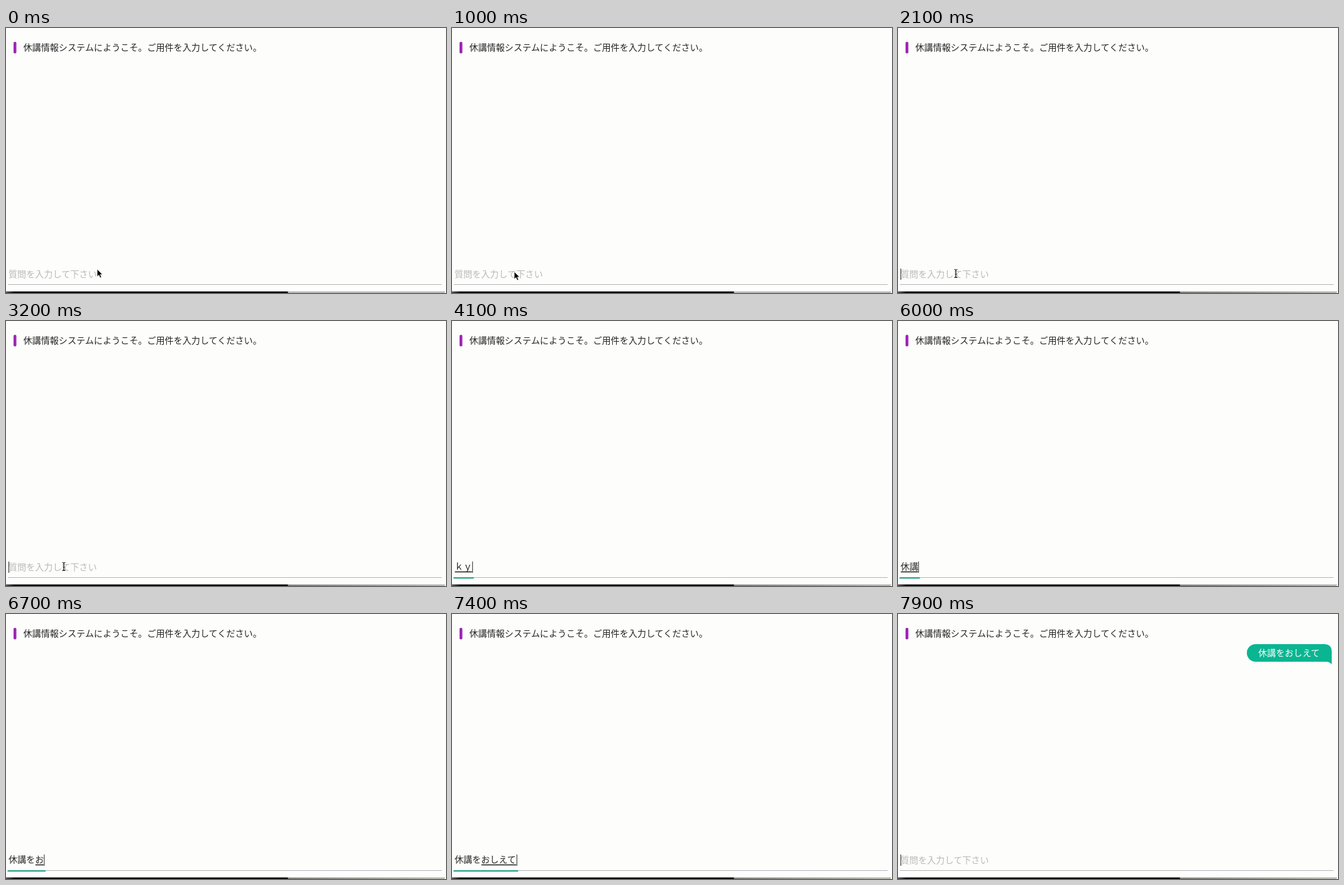
An HTML page for the animation above (8 s loop, 700 by 422 pixels).

```html
<!DOCTYPE html>
<html lang="ja">
<head>
<meta charset="utf-8">
<style>
  html, body { margin: 0; width: 100%; height: 100%; overflow: hidden; background: #fdfdfc; }
  svg { display: block; width: 100vw; height: 100vh; }
  text { font: 500 14.1px "Noto Sans CJK JP", "Noto Sans CJK", sans-serif; fill: #262626; }
  #hint { font-weight: 400; fill: #b9b9b4; }
  #popup text { font-size: 15px; fill: #111; }
  #bubble text { fill: #fdfdfc; }
  #popup rect { filter: drop-shadow(0 1px 3px #0005); }
</style>
</head>
<body>
<svg viewBox="0 0 700 422">
  <defs>
    <linearGradient id="fade">
      <stop offset="0" stop-color="#7c7c78"/>
      <stop offset="1" stop-color="#b8b8b0"/>
    </linearGradient>
    <linearGradient id="bar">
      <stop offset="0" stop-color="#55555c"/>
      <stop offset=".03" stop-color="#08080a"/>
    </linearGradient>
  </defs>
  <rect width="700" height="422" fill="#fdfdfc"/>
  <rect x="12" y="22" width="4.5" height="18.5" rx="2" fill="#9c27b0"/>
  <text x="27.5" y="36">休講情報システムにようこそ。ご用件を入力してください。</text>

  <g id="bubble">
    <path d="M569 48H678Q690 48 690 60V80.500Q687 76 681 76H569A14 14 0 0 1 569 48Z" fill="#0ab592"/>
    <text x="573" y="67.3">休講をおしえて</text>
  </g>

  <rect x="3" y="408" width="690" height="1" fill="#b4b4b8"/>
  <rect id="focus" x="2.500" y="408" height="2.300" fill="#2ca58a"/>
  <rect y="419" width="699" height="1" fill="#d6d6d4"/>
  <rect id="track" x="448" y="420" width="250" height="2"/>
  <rect y="419.600" width="448.500" height="2.400" fill="url(#bar)"/>

  <text id="hint" x="4" y="397">質問を入力して下さい</text>
  <text id="typed" x="4" y="396.3"></text>
  <rect id="under" y="398.700" height="1.600" fill="#262626"/>
  <rect id="caret" y="383" width="1" height="18" fill="#262626"/>

  <g id="popup">
    <rect x="-4" y="401" width="156.500" height="26" fill="#fdfdfc"/>
    <text x="3.7" y="417">休講</text>
  </g>

  <path id="arrow" d="M0 0V12L2.800 9.400L4.800 14L7 13L5 8.700H8.700Z" fill="#000" stroke="#fff" stroke-width=".8"/>
  <path id="beam" d="M89.500 384.500Q92 384.500 92 386.500Q92 384.500 94.500 384.500M92 386V396M89.500 397.500Q92 397.500 92 395.500Q92 397.500 94.500 397.500M90.500 392H93.500" fill="none" stroke="#111" stroke-width="1.200"/>
</svg>
<script>
const LOOP = 8000, EM = 14.1, FOCUS = 1800, SEND = 7600;
const $ = id => document.getElementById(id);
const show = (id, on) => $(id).style.display = on ? '' : 'none';

// [time, committed text, text being composed]
const keys = [
  [0, '', ''], [3850, '', 'ｋ'], [4050, '', 'ｋｙ'], [4250, '', 'きゅ'],
  [4500, '', 'きゅう'], [4700, '', 'きゅうｋ'], [4850, '', 'きゅうこ'],
  [5050, '', 'きゅうこう'], [5800, '', '休講'], [6050, '休講', ''],
  [6200, '休講', 'ｗ'], [6300, '休講', 'を'], [6450, '休講を', ''],
  [6600, '休講を', 'お'], [6800, '休講を', 'おｓ'], [6900, '休講を', 'おし'],
  [7050, '休講を', 'おしえ'], [7200, '休講を', 'おしえｔ'],
  [7300, '休講を', 'おしえて'], [7450, '休講をおしえて', ''], [SEND, '', '']
];
// [time, x, y]
const path = [[0, 145, 384], [200, 145, 384], [1000, 99, 388], [1500, 91, 390], [FOCUS, 91, 390]];

function pointer(t) {
  const i = Math.max(1, path.findIndex(p => p[0] > t));
  const [a, b] = [path[i - 1], path[i]];
  const u = (t - a[0]) / (b[0] - a[0]), e = u * u * (3 - 2 * u);
  return [a[1] + (b[1] - a[1]) * e, a[2] + (b[2] - a[2]) * e];
}

function draw(t) {
  const [, done, comp] = keys.findLast(k => k[0] <= t);
  const text = done + comp, end = 4 + text.length * EM, focused = t >= FOCUS;

  $('typed').textContent = text;
  show('hint', !text);
  show('under', comp);
  $('under').setAttribute('x', 4.5 + done.length * EM);
  $('under').setAttribute('width', Math.max(0, comp.length * EM - 1));

  const blink = (t - (t < SEND ? FOCUS : SEND)) % 1000 < 500;
  show('caret', focused && (comp || blink));
  $('caret').setAttribute('x', end);
  show('focus', text);
  $('focus').setAttribute('width', end);
  $('track').setAttribute('fill', focused ? 'url(#fade)' : '#b8b8b8');

  show('popup', t >= 4850 && t < 5800);
  show('bubble', t >= SEND);
  show('arrow', !focused);
  show('beam', focused && t < keys[1][0]);
  if (!focused) $('arrow').setAttribute('transform', `translate(${pointer(t)})`);
}

const start = performance.now();
function frame() {
  draw((performance.now() - start) % LOOP);
  requestAnimationFrame(frame);
}
frame();
</script>
</body>
</html>
```
